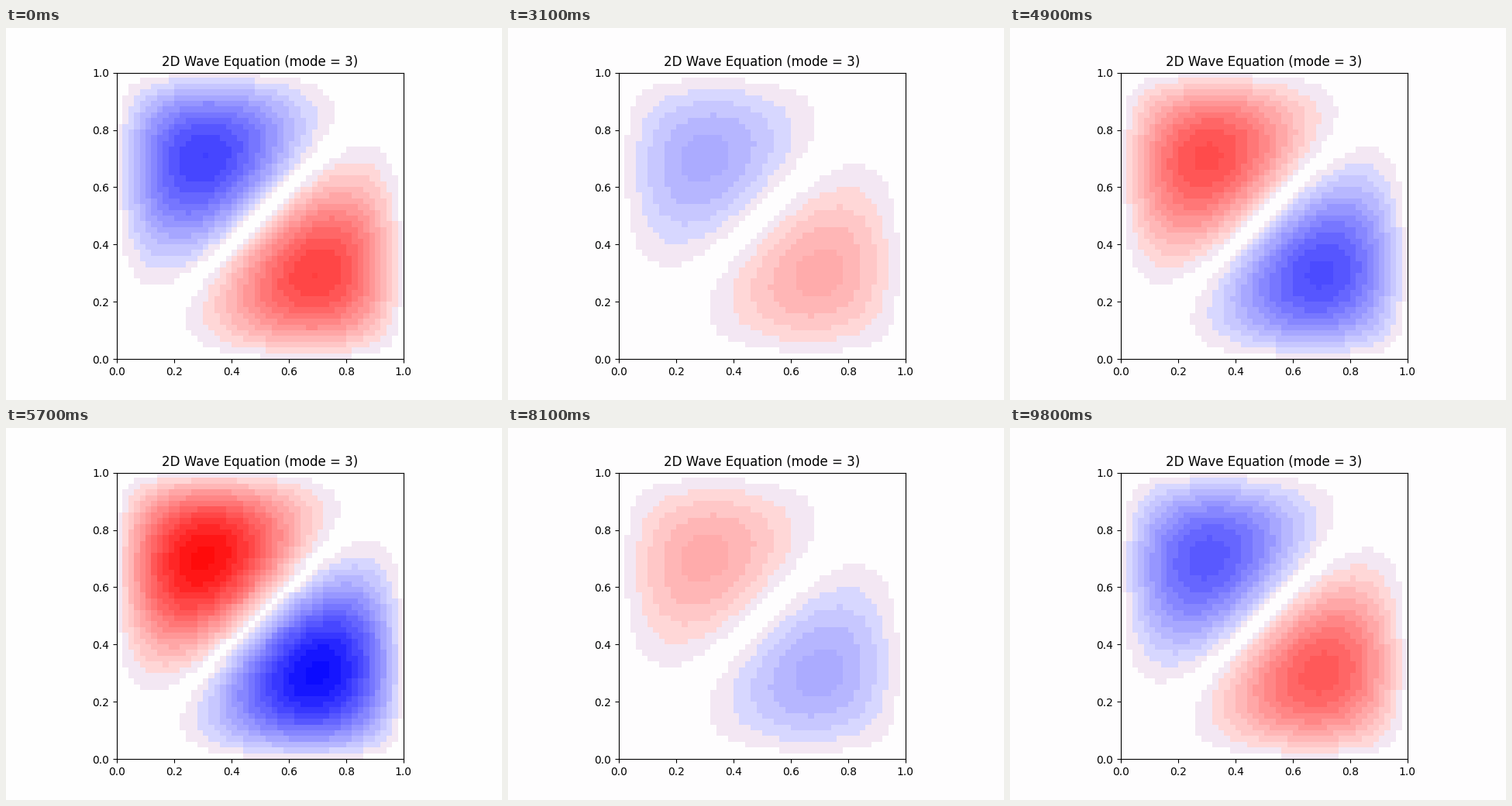
Write a matplotlib script that moves like this. It is 640 px wide and 480 px high and loops after 9.9 s.

```python
import numpy as np
import matplotlib.pyplot as plt
from matplotlib.animation import FuncAnimation

N = 50            # interior grid points per side
FRAMES = 99
PERIOD = 100      # frames per oscillation
PEAK = 11.5       # frame position of the largest amplitude
TILT = -0.013     # slight imbalance between the two degenerate modes

WIDTH, HEIGHT = 640, 480
CELL_AREA = (0.77 * HEIGHT / N) ** 2
MARGIN_AREA = WIDTH * HEIGHT - CELL_AREA * N * N


def mode_shape():
    """Mix of the (2,1) and (1,2) modes of a clamped square membrane."""
    p = np.pi * np.arange(1, N + 1) / (N + 1)
    x, y = np.meshgrid(p, p)
    u = np.sin(x) * np.sin(y) * ((1 - TILT) * np.cos(y) - (1 + TILT) * np.cos(x))
    return u / np.abs(u).max()


def posterize(rgb):
    """Group colours into coarse buckets and paint each with its mean.

    Returns the cell colours and the shared near-white backdrop colour.
    """
    colors = np.vstack([rgb.reshape(-1, 3), [[255, 255, 255]]]).astype(int)
    weights = np.full(len(colors), CELL_AREA)
    weights[-1] = MARGIN_AREA
    keys = (colors >> [5, 4, 5]) @ [256, 16, 1]
    groups = np.unique(keys, return_inverse=True)[1].ravel()
    total = np.bincount(groups, weights)
    means = np.stack([np.bincount(groups, weights * c) / total for c in colors.T], axis=1)
    flat = np.floor(means + 1e-6).astype(np.uint8)[groups]
    return flat[:-1].reshape(rgb.shape), flat[-1]


def wave_colors(frame):
    field = shape * np.cos(2 * np.pi * (frame - PEAK) / PERIOD)
    rgb = plt.cm.bwr((field + 1) / 2, bytes=True)[..., :3]
    return posterize(rgb)


def update(frame):
    cells, backdrop = wave_colors(frame)
    image.set_data(cells)
    fig.set_facecolor(backdrop / 255)
    ax.set_facecolor(backdrop / 255)
    return (image,)


shape = mode_shape()
fig, ax = plt.subplots(figsize=(WIDTH / 100, HEIGHT / 100), dpi=100)
image = ax.imshow(wave_colors(0)[0], extent=(0, 1, 0, 1), origin="lower",
                  interpolation="nearest")
ax.set_title("2D Wave Equation (mode = 3)")

anim = FuncAnimation(fig, update, frames=FRAMES, interval=100, repeat=True,
                     repeat_delay=0, blit=False)
plt.show()
```
